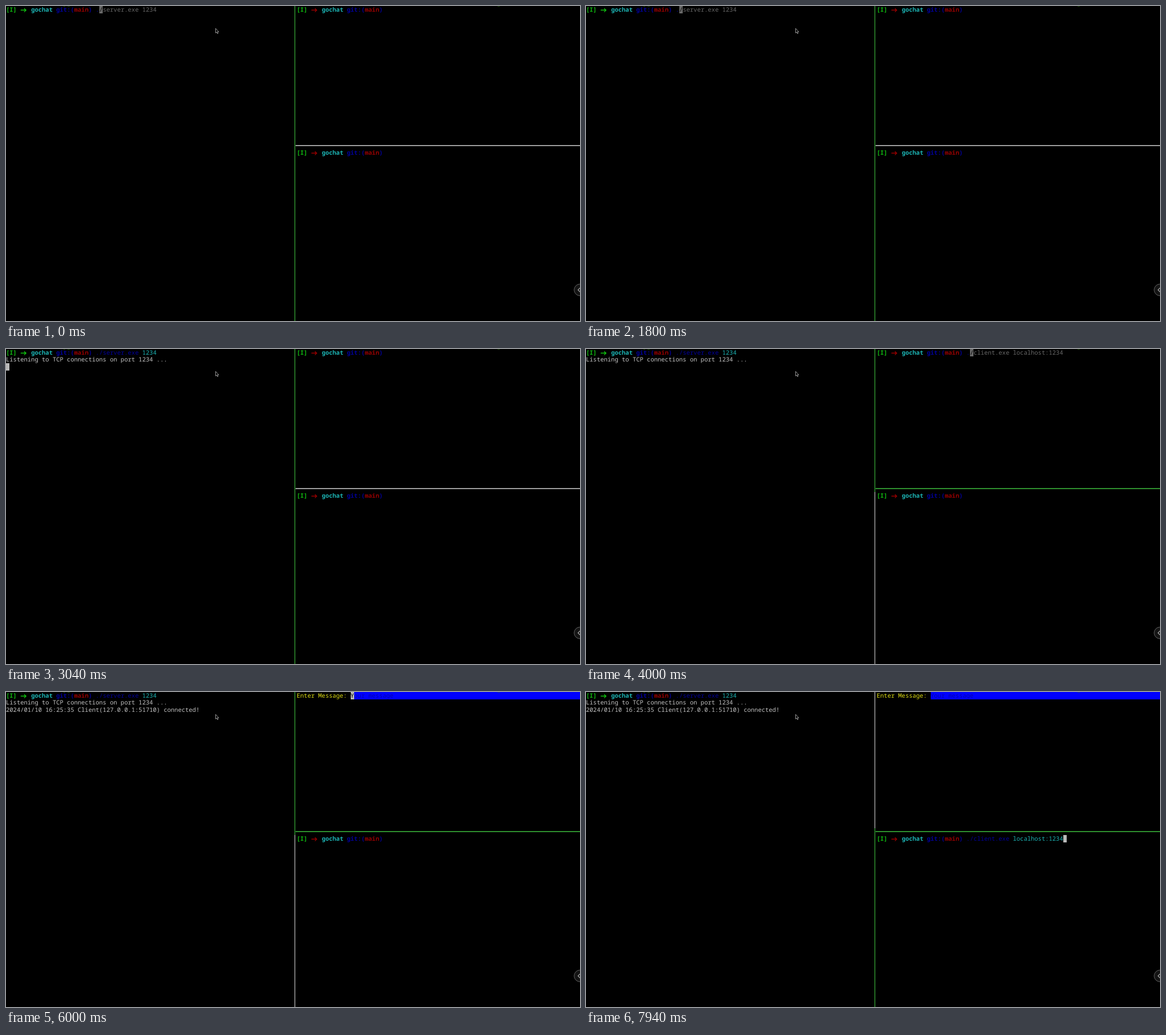
Write an HTML page that moves like this. It is 1009 px wide and 555 px high and loops after 8 s.

```html
<!DOCTYPE html>
<html lang="en">
<head>
<meta charset="utf-8">
<title>Terminal chat</title>
<style>
  html, body { margin: 0; width: 100%; height: 100%; overflow: hidden; background: #000; }
  #stage {
    position: relative; width: 1009px; height: 555px; overflow: hidden; background: #000;
    font: 500 10.508px/12.6px "Noto Sans Mono", "DejaVu Sans Mono", monospace;
    text-rendering: geometricPrecision; font-variant-ligatures: none;
    color: #c2c2c2; white-space: pre;
  }
  .pane, #overlay { position: absolute; }
  .pane div { height: 12.6px; }
  #left { left: 0; top: .7px; }
  #top { left: 511px; top: .7px; width: 498px; }
  #bottom { left: 511px; top: 252.9px; }
  #overlay { left: 0; top: 0; }
  .line { stroke: #b4b4b4; }
  .line.on { stroke: #35a535; }
  .pane span { display: inline-block; height: 12.6px; vertical-align: top; }
  .pane svg { width: 12.61px; height: 12.6px; vertical-align: top; fill: none; stroke: currentColor; }
  .green { color: #10c010; } .cyan { color: #1cb5b5; } .blue { color: #00009c; }
  .red { color: #960000; } .dim { color: #686868; } .yellow { color: #dede12; }
  .bold { font-weight: 700; }
  .cursor, .field { background: var(--fill); box-shadow: 0 -1px var(--fill); }
  .cursor { --fill: #b9b9b9; color: #000; }
  .dim.cursor { --fill: #686868; }
  .field { --fill: #00f; color: #0000b0; width: 404px; }
</style>
</head>
<body>
<div id="stage">
  <div class="pane" id="left"></div>
  <div class="pane" id="top"></div>
  <div class="pane" id="bottom"></div>
  <svg id="overlay" width="1009" height="555">
    <g stroke-width="1.3">
      <path class="line" id="upper" d="M507.75 0V240"/>
      <path class="line on" d="M507.75 240V252"/>
      <path class="line" id="lower" d="M507.75 252V555"/>
      <path class="line" id="across" d="M509 245.9H1009" stroke-width="1.7"/>
    </g>
    <path d="M101 .3h3M108 .3h4M864 .3h4" stroke="#2c6a10" stroke-width=".7"/>
    <path d="M368.5 39.5v8l1.8-1.5 1.3 2.8 1.3-.6-1.3-2.7h2.4z" fill="#000" stroke="#b8b8b8" stroke-width=".8"/>
    <circle cx="1009" cy="500.2" r="10.3" fill="#141414" stroke="#626262"/>
    <path d="M1009.5 496.2l-4 4 4 4" fill="none" stroke="#b8b8b8" stroke-width="1.1"/>
  </svg>
</div>
<script>
const LOOP = 8000;
const $ = id => document.getElementById(id);
const span = (style, text) => `<span class="${style}">${text}</span>`;
const row = (...parts) => `<div>${parts.join("")}</div>`;
const cursor = span("cursor", " ");

const arrow = color => span(color,
  '<svg viewBox="0 0 12.61 12.6"><path d="M.8 6.3H10M6.9 3.2L10.2 6.3 6.9 9.4" stroke-width="1.4"/></svg>');

const prompt = color => span("green bold", "[I]") + " " + arrow(color) + " " +
  span("cyan bold", "gochat") + " " + span("blue bold", "git:(") +
  span("red bold", "main") + span("blue bold", ")") + " ";

// Command line stages: dot typed with a suggestion, then completed
const hint = (name, arg) => span("blue", ".") + span("dim cursor", "/") + span("dim", `${name}.exe ${arg}`);
const command = (name, arg) => span("blue", `./${name}.exe`) + " " + span("cyan", arg);

const server = ["server", "1234"], client = ["client", "localhost:1234"];
const shell = (color, rest = "") => row(prompt(color), rest);
const idle = shell("red");
const ready = shell("red", cursor);
const hinted = shell("red", hint(...client));
const complete = shell("red", command(...client) + cursor);

const listening = shell("green", command(...server)) +
  row("Listening to TCP connections on port 1234 ...");
const connected = listening +
  row("2024/01/10 16:25:35 Client(127.0.0.1:51710) connected!");

const form = focused => row(span("yellow", "Enter Message: "),
  span("field", (focused ? span("cursor", "Y") : "Y") + "our message"));

// start time, focused pane, left, top, bottom
const steps = [
  [0, "left", shell("green", hint(...server)), idle, idle],
  [2200, "left", shell("green", command(...server) + cursor), idle, idle],
  [2650, "left", listening + row(cursor), idle, idle],
  [3400, "top", listening, ready, idle],
  [3950, "top", listening, hinted, idle],
  [4650, "top", listening, complete, idle],
  [5600, "top", connected, form(true), idle],
  [6450, "bottom", connected, form(false), ready],
  [6750, "bottom", connected, form(false), hinted],
  [7450, "bottom", connected, form(false), complete],
];

let shown;
function draw() {
  const time = performance.now() % LOOP;
  const step = steps.findLast(([start]) => start <= time);
  if (step !== shown) {
    shown = step;
    const [, focus, left, top, bottom] = step;
    $("left").innerHTML = left;
    $("top").innerHTML = top;
    $("bottom").innerHTML = bottom;
    $("upper").classList.toggle("on", focus !== "bottom");
    $("lower").classList.toggle("on", focus !== "top");
    $("across").classList.toggle("on", focus !== "left");
  }
  requestAnimationFrame(draw);
}
draw();
</script>
</body>
</html>
```
